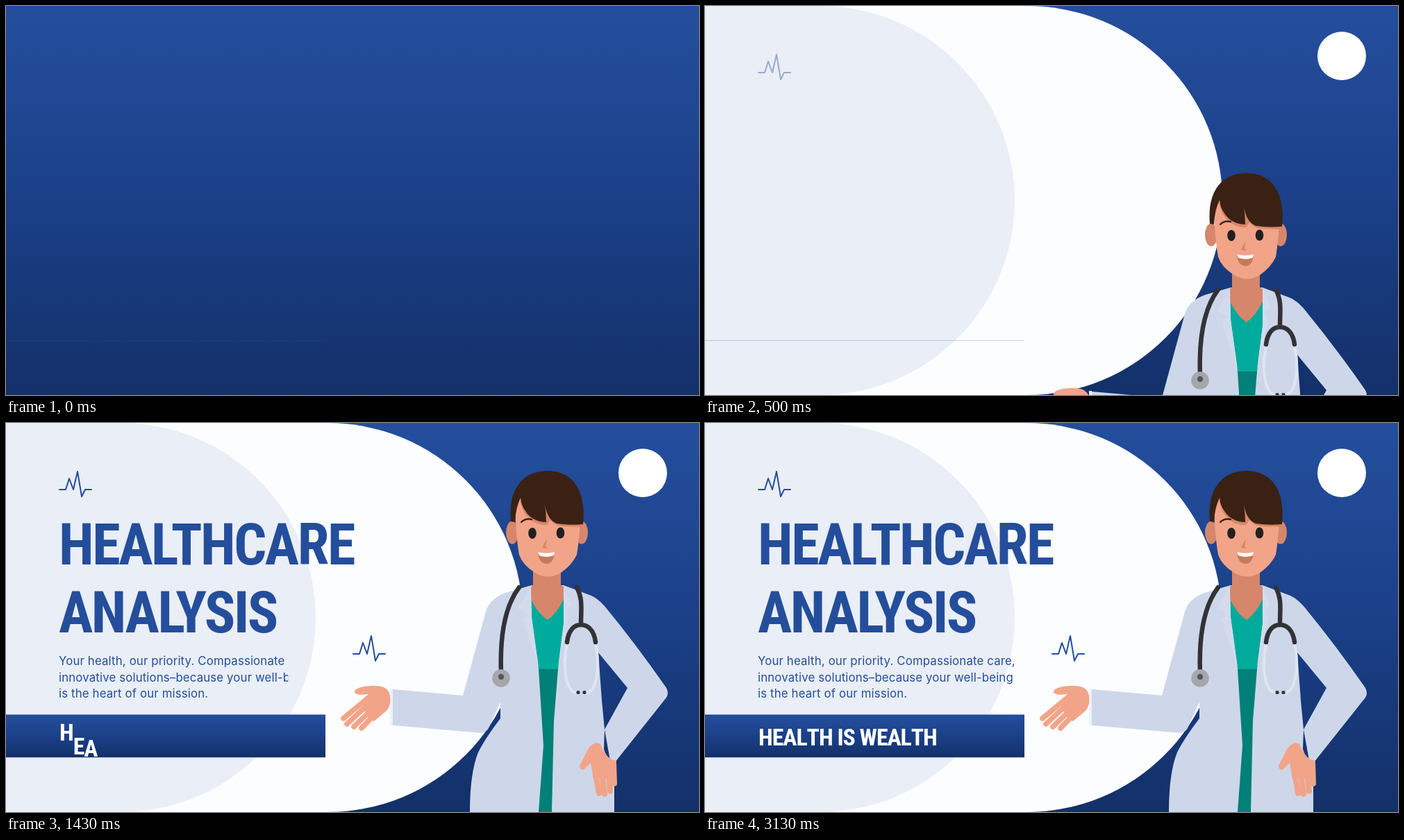
An HTML page for the animation above (5010 ms loop, 998 by 561 pixels).

```html
<!DOCTYPE html>
<html lang="en">
<head>
<meta charset="utf-8">
<title>Healthcare Analysis</title>
<style>
  html, body { margin: 0; width: 100%; height: 100%; overflow: hidden; background: #1b4288; }
  svg { display: block; width: 100vw; height: 100vh; }
  .display { font-family: "Roboto Condensed", "Open Sans Condensed", Roboto, "Open Sans", sans-serif;
    font-weight: 700; font-stretch: 75%; letter-spacing: -.03em; }
  .body { font: 400 16.8px Inter, sans-serif; letter-spacing: .15px; }
  .skin { fill: #f2a488; }
  .shade { fill: #d6866a; }
  .coat { fill: #ced7ea; fill-rule: evenodd; }
  .fingers { fill: none; stroke: #f2a488; stroke-linecap: round; }
  .tube { fill: none; stroke: #333236; stroke-width: 6.5; stroke-linecap: round; }
</style>
</head>
<body>
<svg viewBox="0 0 998 561" preserveAspectRatio="none">
  <defs>
    <linearGradient id="blue" x1="0" y1="0" x2="0" y2="1">
      <stop offset="0" stop-color="#244e9d"/>
      <stop offset=".5" stop-color="#1b4088"/>
      <stop offset="1" stop-color="#133069"/>
    </linearGradient>
    <clipPath id="bannerClip"><rect y="420" width="460" height="62.5"/></clipPath>
    <clipPath id="copyClip"><rect id="copyWipe" x="70" y="325" height="90"/></clipPath>
    <path id="pulse" d="M77 96h9l5-16 6 16 6-26 6 36 5-10h9" fill="none" stroke="#244e9b"
      stroke-width="2" stroke-linejoin="round" stroke-linecap="round"/>
  </defs>

  <rect width="998" height="561" fill="url(#blue)"/>
  <rect id="whitePill" x="-400" width="1144" height="561" rx="280.5" fill="#fcfdfe"/>
  <rect id="tintPill" x="-400" width="846" height="561" rx="280.5" fill="#24409b"/>
  <circle id="badge" cx="917" cy="72" r="35" fill="#fff"/>

  <use id="pulseTop" href="#pulse"/>
  <use id="pulseSide" href="#pulse" x="423" y="237"/>

  <g id="title" class="display" fill="#244e9b">
    <text x="76" y="204">HEALTHCARE</text>
    <text x="76" y="302">ANALYSIS</text>
  </g>
  <rect id="titleBlock" y="115" height="210" fill="#244e9b"/>

  <g class="body" fill="#244e9b" clip-path="url(#copyClip)">
    <text x="76" y="349">Your health, our priority. Compassionate care,</text>
    <text x="76" y="372.5">innovative solutions–because your well-being</text>
    <text x="76" y="396">is the heart of our mission.</text>
  </g>

  <g clip-path="url(#bannerClip)">
    <rect id="banner" width="460" height="62" fill="url(#blue)"/>
  </g>
  <text id="slogan" class="display" x="77" fill="#fff">HEALTH IS WEALTH</text>

  <g id="doctor">
    <!-- coat and arms -->
    <path class="coat" d="M757 234L722 244Q697 252 691 272L658 393 557 384V436L684 447Q691 447 695 440L712 402V426
      Q690 455 680 475 668 505 668 561H876V520L862 442 895 382 853 331 858 400 862 442 861 470Q866 488 878 488
      L951 396Q955 390 951 382 908 320 862 264 852 253 843 249L803 234Z"/>
    <path d="M553 383h4v53h-4z" fill="#eef1f8"/>
    <!-- neck and scrubs -->
    <path d="M756 236H803V290L795 355H767L757 280Z" fill="#00aa9c"/>
    <path class="shade" d="M759 205H799V234L803 236V254Q793 275 780 284 766 275 756 254V236L759 234Z"/>
    <path d="M767 355H795L789 430 786 561H767L774 465Z" fill="#008077"/>
    <path d="M756 236L737 268 752 276 744 283 767 352 757 280ZM803 236L814 262 807 270 811 280 795 352 803 290Z" fill="#d3dbed"/>
    <!-- head -->
    <ellipse class="shade" cx="729" cy="158" rx="9" ry="16.5"/>
    <ellipse class="shade" cx="829" cy="158" rx="9" ry="16.5"/>
    <path class="skin" d="M733 105H827Q828 155 822 190 815 205 799 216 780 227 762 216 744 205 739 190 733 155 733 105Z"/>
    <path class="shade" d="M740 112Q746 138 765 145 775 148 779 147L784 140Q790 148 800 149L828 150V125Z"/>
    <path d="M727 142C723 95 744 69 780 69S836 97 831 146Q812 148 793 145 780 140 776 118 778 130 778 143
      757 142 748 127 742 119 741 108 734 122 733 143Z" fill="#3a2114"/>
    <path d="M742 143Q748 137 757 139" fill="none" stroke="#3a2114" stroke-width="2.4" stroke-linecap="round"/>
    <ellipse cx="758" cy="159" rx="5.8" ry="8" fill="#22201f"/>
    <ellipse cx="798.5" cy="158.5" rx="5.8" ry="8" fill="#22201f"/>
    <path class="shade" d="M779 167L772 179Q775 182 780 180L777 178Z"/>
    <path d="M766 186Q778 189 790 186 789 203 778 203 767 202 766 186Z" fill="#c9785a"/>
    <path d="M766 186Q778 189 790 186L789 191Q778 195 768 191Z" fill="#fff"/>
    <!-- stethoscope -->
    <path class="tube" d="M739 237C720 262 711 305 713 360"/>
    <circle cx="713" cy="368" r="12.8" fill="#a5a7ac"/>
    <circle cx="713" cy="366" r="4.2" fill="#55565a"/>
    <path d="M808 319C801 352 806 389 823 389M849 319C856 352 851 389 834 389" fill="none" stroke="#dfe5f2" stroke-width="4"/>
    <path class="tube" d="M822 237C831 254 828 268 828 290M808 316C810 299 818 291 828 291S847 299 849 316"/>
    <circle cx="824" cy="388.5" r="2.6" fill="#333236"/>
    <circle cx="833" cy="388.5" r="2.6" fill="#333236"/>
    <!-- open hand -->
    <path class="skin" d="M553 394C552 382 542 379 530 379 514 379 501 383 502 388 504 393 513 392 522 391
      L512 405 522 426 530 430 548 415Q555 407 553 394Z"/>
    <path class="fingers" stroke-width="7.6" d="M522 396L486 426M526 402L491 434M531 409L501 438M538 413L512 440"/>
    <!-- hand on hip -->
    <path class="skin" d="M850 461Q839 465 835 477L826 494Q826 501 832 500L842 490 846 513H879V487Q865 486 856 463Z"/>
    <path class="fingers" stroke-width="8" d="M848 500L854 534M858 505L862 535M867 503L870 531M875 490L876 520"/>
  </g>
</svg>
<script>
  const LOOP = 5010;
  const el = id => document.getElementById(id);
  const progress = (t, from, to) => Math.min(1, Math.max(0, (t - from) / (to - from)));
  const easeOut = (p, power) => 1 - (1 - p) ** power;
  const easeInOut = p => p < .5 ? 2 * p * p : 1 - 2 * (1 - p) ** 2;
  const smooth = p => p * p * (3 - 2 * p);
  const set = (id, attrs) => {
    for (const name in attrs) el(id).setAttribute(name, attrs[name]);
  };

  // Choose the largest type size whose line stays inside the given room.
  function fitSize(group, line, maxSize, room) {
    group.style.fontSize = '100px';
    const size = Math.min(maxSize, 100 * room / line.getComputedTextLength());
    group.style.fontSize = size + 'px';
  }
  fitSize(el('title'), el('title').firstElementChild, 113, 425);
  fitSize(el('slogan'), el('slogan'), 46, 250);

  // Each letter drops in, dips under the line and springs back: [age, offset].
  const BOUNCE = [[0, -13], [95, 24], [250, -7], [480, 0]];
  function bounce(age) {
    if (age < 0) return -1000;
    for (let i = 1; i < BOUNCE.length; i++) {
      const [t0, y0] = BOUNCE[i - 1], [t1, y1] = BOUNCE[i];
      if (age < t1) return y0 + (y1 - y0) * smooth((age - t0) / (t1 - t0));
    }
    return 0;
  }
  const letters = [...el('slogan').textContent];

  function draw(t) {
    const fade = t < 130 ? 0 : progress(t, 98, 338);
    const slide = (size, tau) => `translate(${size * Math.exp((170 - t) / tau)} 0)`;
    set('whitePill', { opacity: fade, transform: slide(30, 100) });
    set('tintPill', { opacity: fade * .08, transform: slide(24, 41) });
    set('badge', { opacity: progress(t, 180, 420) });
    set('pulseTop', { opacity: progress(t, 430, 600) });
    set('pulseSide', { opacity: progress(t, 750, 900) });

    const rise = t < 400 ? 600 : t > 1170 ? 0 : 23 * Math.exp((670 - t) / 84);
    set('doctor', { transform: `translate(0 ${rise})` });

    const right = 76 + 502 * easeInOut(progress(t, 645, 820));
    const left = 76 + 502 * easeInOut(progress(t, 820, 983));
    set('titleBlock', { x: left, width: right - left });
    set('title', { visibility: t < 820 ? 'hidden' : 'visible' });

    set('copyWipe', { width: t < 780 ? 0 : 6 + 376 * easeOut(progress(t, 780, 1780), 2) });
    set('banner', { y: 482.5 - 62 * easeOut(progress(t, 840, 1240), 3) });
    set('slogan', { y: letters.map((_, i) => 465 + bounce(t - 1185 - 90 * i)).join(' ') });
  }

  const start = performance.now();
  function frame() {
    draw((performance.now() - start) % LOOP);
    requestAnimationFrame(frame);
  }
  frame();
</script>
</body>
</html>
```
